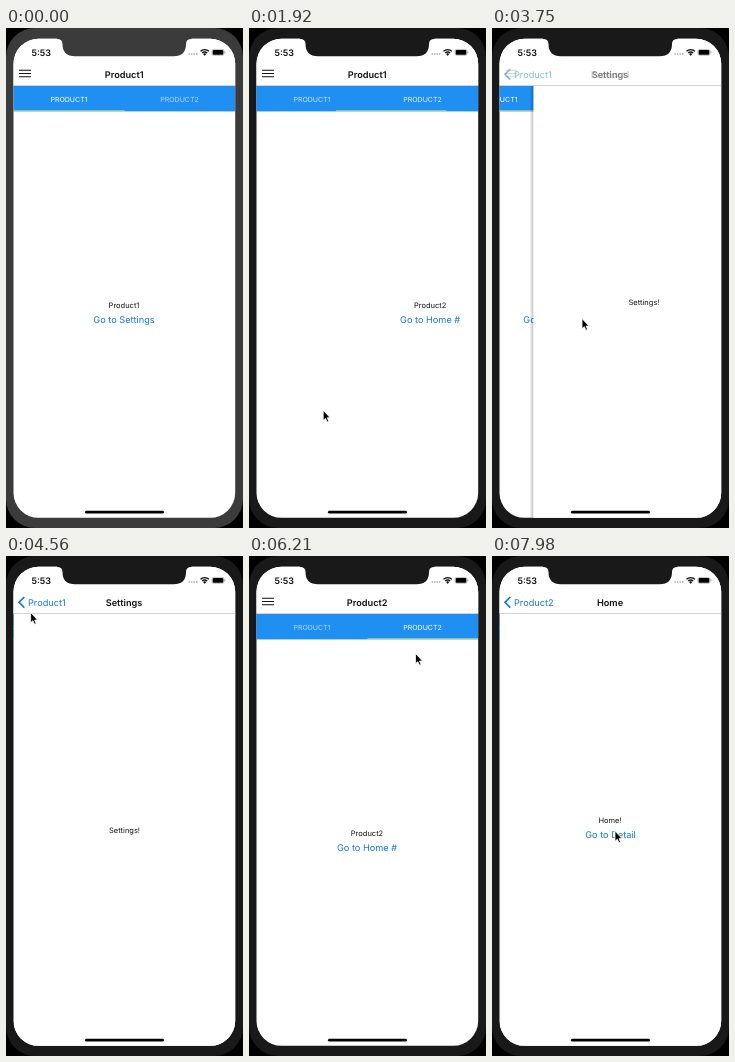
Write an HTML page that moves like this. It is 237 px wide and 500 px high and loops after 8 s.

```html
<!DOCTYPE html>
<html lang="en">
<head>
<meta charset="utf-8">
<title>Tabs and stack navigation</title>
<style>
  html, body { margin: 0; width: 100%; height: 100%; overflow: hidden; background: #000; }
  svg { display: block; width: 100%; height: 100%; }
  text {
    font: 9.2px Inter, "Liberation Sans", sans-serif; fill: #111;
    text-anchor: middle; text-rendering: geometricPrecision;
  }
  .bold { font-weight: 600; }
  .small { font-size: 7.5px; }
  .link { fill: #1478d8; }
  .back { text-anchor: start; }
  .tab { font-size: 7px; fill: #fff; }
  .clock { font-size: 9px; font-weight: 600; }
</style>
</head>
<body>
<svg viewBox="0 0 237 500">
  <defs>
    <clipPath id="screen"><rect x="7.5" y="10.8" width="221.7" height="479" rx="25"/></clipPath>
    <linearGradient id="shade">
      <stop offset="0" stop-color="#000" stop-opacity="0"/>
      <stop offset="1" stop-color="#000" stop-opacity=".3"/>
    </linearGradient>
  </defs>
  <rect width="237" height="500"/>
  <rect class="bezel" width="237" height="500" rx="29"/>

  <g clip-path="url(#screen)">
    <rect y="10" width="237" height="482" fill="#fff"/>

    <g id="tabs">
      <g id="pages">
        <text class="small" x="118" y="279.6">Product1</text>
        <text class="link" x="118" y="295.1">Go to Settings</text>
        <text class="small" x="339" y="279.6">Product2</text>
        <text class="link" x="339" y="295.1">Go to Home #</text>
      </g>
      <rect x="7" y="58" width="222" height="25.4" fill="#208ff2"/>
      <text class="tab" id="tab1" x="63" y="73.7">PRODUCT1</text>
      <text class="tab" id="tab2" x="173.5" y="73.7">PRODUCT2</text>
      <rect id="marker" x="8" y="82.4" width="110.5" height="1" fill="#d6e47c"/>
    </g>

    <g id="card">
      <rect id="shadow" x="4" y="57" width="4" height="435" fill="url(#shade)"/>
      <rect x="8" y="57" width="222" height="435" fill="#fff"/>
      <g id="settings"><text class="small" x="118.5" y="276.6">Settings!</text></g>
      <g id="home">
        <text class="small" x="118" y="266.7">Home!</text>
        <text class="link" x="118.5" y="282.4">Go to Detail</text>
      </g>
    </g>

    <rect x="7" y="10" width="223" height="47.2" fill="#fff"/>
    <rect x="7" y="57.2" width="223" height=".8" fill="#c4c8cc"/>
    <g id="rootBar">
      <path d="M13 42.2H25M13 45.5H25M13 48.8H25" stroke="#111" stroke-width="1.1"/>
      <text class="bold" id="rootTitle" x="118.2" y="49.5"></text>
    </g>
    <g id="cardBar">
      <path d="M18.3 41L13 46.3L18.3 51.6" fill="none" stroke="#1478d8" stroke-width="1.7"/>
      <text class="link back" id="backLabel" x="22" y="49.6"></text>
      <text class="bold" id="cardTitle" x="118" y="49.5"></text>
    </g>

    <text class="clock" x="35.2" y="27.5">5:53</text>
    <path d="M182.5 26H191.5" stroke="#aaa" stroke-width="1.4" stroke-dasharray="1.4 1.1"/>
    <path d="M194.5 23.3A6 6 0 0 1 202.9 23.3M196.2 25.1A3.7 3.7 0 0 1 201.2 25.1" fill="none" stroke="#111" stroke-width="1.3"/>
    <path d="M197.2 26.2L198.7 27.7L200.2 26.2A2 2 0 0 0 197.2 26.2"/>
    <rect x="206" y="21.4" width="12" height="5.9" rx="1.6" fill="none" stroke="#999" stroke-width=".6"/>
    <rect x="206.7" y="22" width="10.6" height="4.7" rx=".9"/>
    <rect x="218.5" y="23.3" width=".9" height="2" rx=".4" fill="#999"/>
    <rect x="79" y="482.8" width="79" height="2.8" rx="1.4"/>
  </g>

  <path class="bezel" d="M51 10V11Q56.5 11 56.5 16Q56.5 28.3 69 28.3H167.5Q180 28.3 180 16Q180 11 185.5 11V10Z"/>
  <path id="cursor" d="M0 0V10.2L2.3 8.2L3.9 11.7L5.6 11L4 7.6H7Z" stroke="#fff" stroke-width=".8"/>
</svg>
<script>
const LOOP = 8000;
const $ = id => document.getElementById(id);
const bezels = document.querySelectorAll('.bezel');

// Steps: time, then values.
const cursorPath = [
  [850, 237, 470], [1120, 117.5, 390], [1240, 117.5, 390], [1480, 166, 385], [1620, 166, 385],
  [1860, 75, 383], [2100, 70, 378], [2330, 70, 378], [2540, 145, 373.5], [2740, 145, 373.5],
  [3300, 90, 290.5], [3900, 90, 290.5], [4650, 22, 47], [4980, 22, 47], [5280, 80.5, 98.5],
  [5680, 172, 72], [6050, 172, 72], [6800, 126, 287], [7450, 126, 287], [7850, 123, 275]
];
const pagerPath = [
  [1620, 0], [1860, .42], [2150, 1], [2330, 1], [2540, .62], [2865, 0], [5800, 0], [6130, 1]
];
const PUSH_SETTINGS = 3567, POP = 4940, PUSH_HOME = 7180;

const smooth = u => u * u * (3 - 2 * u);
const easeOut = u => 1 - (1 - u) ** 3;

function track(steps, t, ease) {
  const next = steps.findIndex(s => s[0] > t);
  if (next === 0) return steps[0].slice(1);
  if (next < 0) return steps[steps.length - 1].slice(1);
  const a = steps[next - 1], b = steps[next];
  const u = ease((t - a[0]) / (b[0] - a[0]));
  return a.slice(1).map((v, i) => v + (b[i + 1] - v) * u);
}

// Critically damped spring from 0 to 1.
function spring(ms) {
  if (ms <= 0) return 0;
  if (ms > 550) return 1;
  const w = 0.01826 * ms;
  return 1 - Math.exp(-w) * (1 + w);
}

const move = (id, x, y = 0) => $(id).setAttribute('transform', `translate(${x} ${y})`);
const fade = (id, v) => $(id).setAttribute('opacity', v);

function draw(t) {
  const [pos] = track(pagerPath, t, easeOut);
  const [x, y] = track(cursorPath, t, smooth);
  const second = t >= 2150 && t < 2890 || t >= 6150;
  const home = t >= PUSH_HOME;
  const push = home ? spring(t - PUSH_HOME) : spring(t - PUSH_SETTINGS) - spring(t - POP);
  const product = second ? 'Product2' : 'Product1';

  bezels.forEach(b => b.setAttribute('fill', t < 1500 ? '#3b3b3b' : '#191919'));
  move('pages', -221 * pos);
  move('marker', 110.5 * pos);
  fade('tab1', 1 - .35 * pos);
  fade('tab2', .65 + .35 * pos);

  move('tabs', -66 * push);
  move('card', 221 * (1 - push));
  fade('card', push > 0 ? 1 : 0);
  fade('shadow', push < 1 ? push : 0);
  fade('settings', home ? 0 : 1);
  fade('home', home ? 1 : 0);

  fade('rootBar', 1 - push);
  fade('cardBar', push ** 4);
  $('rootTitle').textContent = $('backLabel').textContent = product;
  $('cardTitle').textContent = home ? 'Home' : 'Settings';

  move('cursor', x, y);
  fade('cursor', t < 850 ? 0 : 1);
}

const start = performance.now();
function tick() {
  draw((performance.now() - start) % LOOP);
  requestAnimationFrame(tick);
}
tick();
</script>
</body>
</html>
```
